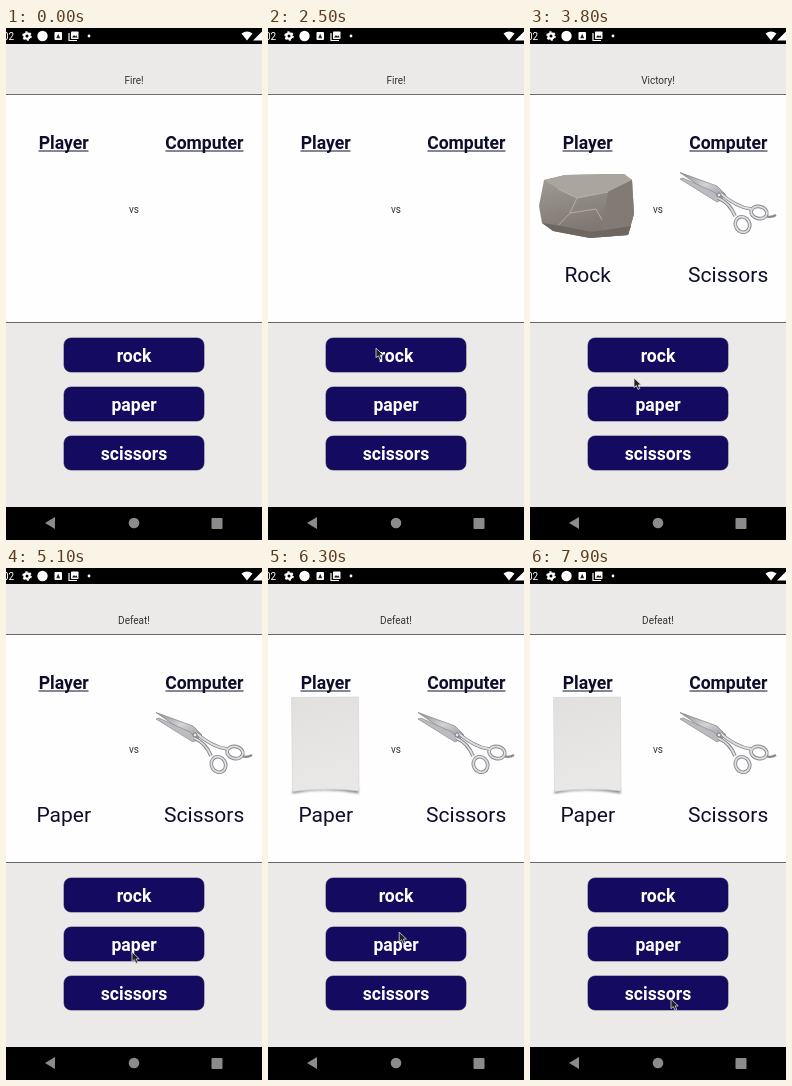
Recreate the animation shown at these times as an HTML page. Size 256 by 512 pixels, loop 8 s.

```html
<!DOCTYPE html>
<html lang="en">
<head>
<meta charset="utf-8">
<title>Rock paper scissors</title>
<style>
html, body { margin: 0; width: 100%; height: 100%; overflow: hidden; background: #ebeae8; }
svg { display: block; width: 256px; height: 512px; }
text { font-family: Roboto, sans-serif; text-anchor: middle; fill: #0e0e2c; }
.small { font-size: 10px; fill: #333; }
.bold { font-size: 17.6px; font-weight: 700; }
.choice { font-size: 21px; }
.button rect { fill: #140a5f; stroke: #0e0748; stroke-width: .6; }
.button text { fill: #fff; }
</style>
</head>
<body>
<svg viewBox="0 0 256 512">
  <defs>
    <linearGradient id="stone" x2=".3" y2="1">
      <stop stop-color="#a39d97"/><stop offset="1" stop-color="#7c756f"/>
    </linearGradient>
    <linearGradient id="sheet" x2=".2" y2="1">
      <stop stop-color="#e2dfdf"/><stop offset="1" stop-color="#eae7e7"/>
    </linearGradient>
    <linearGradient id="steel" x2="1" y2="1">
      <stop stop-color="#8d8d90"/><stop offset=".5" stop-color="#d4d4d6"/><stop offset="1" stop-color="#929296"/>
    </linearGradient>
    <filter id="soft"><feGaussianBlur stdDeviation="1.2"/></filter>
  </defs>

  <rect width="256" height="512" fill="#ebeae8"/>
  <rect y="66" width="256" height="229" fill="#fefefe"/>
  <path d="M0 66.5H256M0 294.5H256" stroke="#6a6a6a"/>

  <!-- status bar -->
  <rect width="256" height="16" fill="#000"/>
  <text x="2.5" y="11.5" font-size="10" style="fill:#fff">02</text>
  <g fill="#fff">
    <circle cx="21" cy="8" r="2.6" fill="none" stroke="#fff" stroke-width="2.2"/>
    <circle cx="21" cy="8" r="4" fill="none" stroke="#fff" stroke-width="1.6" stroke-dasharray="2.1 2.09"/>
    <circle cx="36.5" cy="8" r="5.2"/>
    <rect x="48.5" y="4" width="7.5" height="8" rx="1"/>
    <path d="M52.2 5.8l2 4.5h-4z" fill="#222"/>
    <path d="M63 5v7.5h8" fill="none" stroke="#fff" stroke-width="1.2"/>
    <rect x="65" y="3.5" width="7.5" height="7.5" rx=".8"/>
    <path d="M66 9.5l2-2.5 1.2 1.4 1-1.2 1.5 2.3z" fill="#111"/>
    <circle cx="83" cy="8" r="1.4"/>
    <path d="M235.5 5.5q5.5-4 11 0L241 12.5zM247 12.5L256 3.5V12.5z"/>
  </g>

  <!-- navigation bar -->
  <rect y="479" width="256" height="33" fill="#000"/>
  <g fill="#8b8b8b">
    <path d="M39 495l10-6v12z"/>
    <circle cx="128" cy="495" r="5.3"/>
    <rect x="205.5" y="490" width="11" height="11" rx=".8"/>
  </g>

  <text id="status" class="small" x="128" y="56"></text>
  <text class="small" x="128" y="185">vs</text>
  <text class="bold" x="57.7" y="121">Player</text>
  <text class="bold" x="198.3" y="121">Computer</text>
  <path d="M32.5 123H82.5M159.5 123H237.5" stroke="#0e0e2c"/>

  <g id="rock">
    <path d="M9 178L14 152 35 147 78 146 94 146 102 152 104 186 98 207 60 210 23 203 12 195z" fill="url(#stone)"/>
    <path d="M14 152L35 147 94 146 102 152 78 164 47 170 28 161z" fill="#aaa59f"/>
    <path d="M78 164L102 152 104 186 98 207 70 209z" fill="#827b75"/>
    <path d="M28 161L47 170 40 185 23 203M47 170L78 164M40 185L66 181 72 192" fill="none" stroke="#bdb8b1" stroke-width=".8"/>
    <path d="M12 195L23 203 60 210 98 207 101 198 62 204 26 197z" fill="#6e6761"/>
  </g>

  <g id="paper">
    <path d="M25 222L24 225.5Q57 219 91 225.5L90 220z" fill="#8b8989" filter="url(#soft)"/>
    <path d="M23.5 129.5L90.5 129 91 223Q58 219 24.5 223.5z" fill="url(#sheet)" stroke="#d3d0d0" stroke-width=".6"/>
  </g>

  <g id="scissors" stroke-linejoin="round">
    <path d="M150 144.5L187 158 196 167 191 172 178 164z" fill="url(#steel)" stroke="#77777b" stroke-width=".6"/>
    <path d="M150 151L153 150 184 164 191 172 187 174z" fill="#bcbcc0" stroke="#808085" stroke-width=".6"/>
    <g fill="none" stroke="#88888d" stroke-width="3.6">
      <path d="M190 165Q206 179 221 181M188 170Q200 175 205 188"/>
      <ellipse cx="212.5" cy="196.5" rx="7" ry="8" transform="rotate(-30 212.5 196.5)"/>
      <ellipse cx="229" cy="184.5" rx="8" ry="6" transform="rotate(12 229 184.5)"/>
      <path d="M236 188Q241 190 246 187" stroke-width="2.2"/>
    </g>
    <g fill="none" stroke="#dedee1" stroke-width="1.8">
      <path d="M190 165Q206 179 221 181M188 170Q200 175 205 188"/>
      <ellipse cx="212.5" cy="196.5" rx="7" ry="8" transform="rotate(-30 212.5 196.5)"/>
      <ellipse cx="229" cy="184.5" rx="8" ry="6" transform="rotate(12 229 184.5)"/>
    </g>
    <circle cx="189" cy="167" r="2" fill="#e8e8ea" stroke="#69696d" stroke-width=".8"/>
  </g>

  <text id="player" class="choice" x="57.7" y="253.5"></text>
  <text id="computer" class="choice" x="198.2" y="253.5">Scissors</text>

  <g id="buttons"></g>
  <path id="cursor" d="M0 0V9.6L2.3 7.6 4 11.4 5.8 10.6 4.2 7 7.2 6.8z" fill="#222" stroke="#ddd" stroke-width=".8"/>
</svg>
<script>
const $ = id => document.getElementById(id);
const LOOP = 8000;
const CURSOR_IN = 1200, ROCK_PRESS = 2800, ROCK_LOADED = 3100, PAPER_PRESS = 5100, PAPER_LOADED = 5300;

// time, x, y of the pointer tip
const path = [
  [1200, 36, 258], [1300, 45, 264], [1500, 46, 265], [2000, 85, 323], [2300, 108, 320],
  [3100, 108, 321], [3700, 104, 349], [3900, 104, 351], [4600, 126, 384], [5100, 126, 384],
  [5500, 131, 363], [6200, 131, 363], [6700, 133, 374], [7100, 133, 374], [7800, 141, 431], [8000, 141, 431]
];

$('buttons').innerHTML = ['rock', 'paper', 'scissors'].map((name, i) =>
  `<g class="button" transform="translate(58 ${310 + 49 * i})">
    <rect width="140" height="34" rx="7"/><text class="bold" x="70" y="24">${name}</text></g>`).join('');

function pointerAt(t) {
  const next = Math.max(1, path.findIndex(p => p[0] > t));
  const [t0, x0, y0] = path[next - 1], [t1, x1, y1] = path[next];
  const k = Math.max(0, (t - t0) / (t1 - t0)), ease = k * k * (3 - 2 * k);
  return [x0 + (x1 - x0) * ease, y0 + (y1 - y0) * ease];
}

function show(id, visible) {
  $(id).style.display = visible ? '' : 'none';
}

function draw(t) {
  const played = t >= ROCK_PRESS, second = t >= PAPER_PRESS;
  $('status').textContent = second ? 'Defeat!' : played ? 'Victory!' : 'Fire!';
  $('player').textContent = second ? 'Paper' : played ? 'Rock' : '';
  show('computer', played);
  show('rock', t >= ROCK_LOADED && !second);
  show('scissors', t >= ROCK_LOADED);
  show('paper', t >= PAPER_LOADED);
  show('cursor', t >= CURSOR_IN);
  $('cursor').setAttribute('transform', `translate(${pointerAt(t)})`);
}

function tick() {
  draw(performance.now() % LOOP);
  requestAnimationFrame(tick);
}
tick();
</script>
</body>
</html>
```
